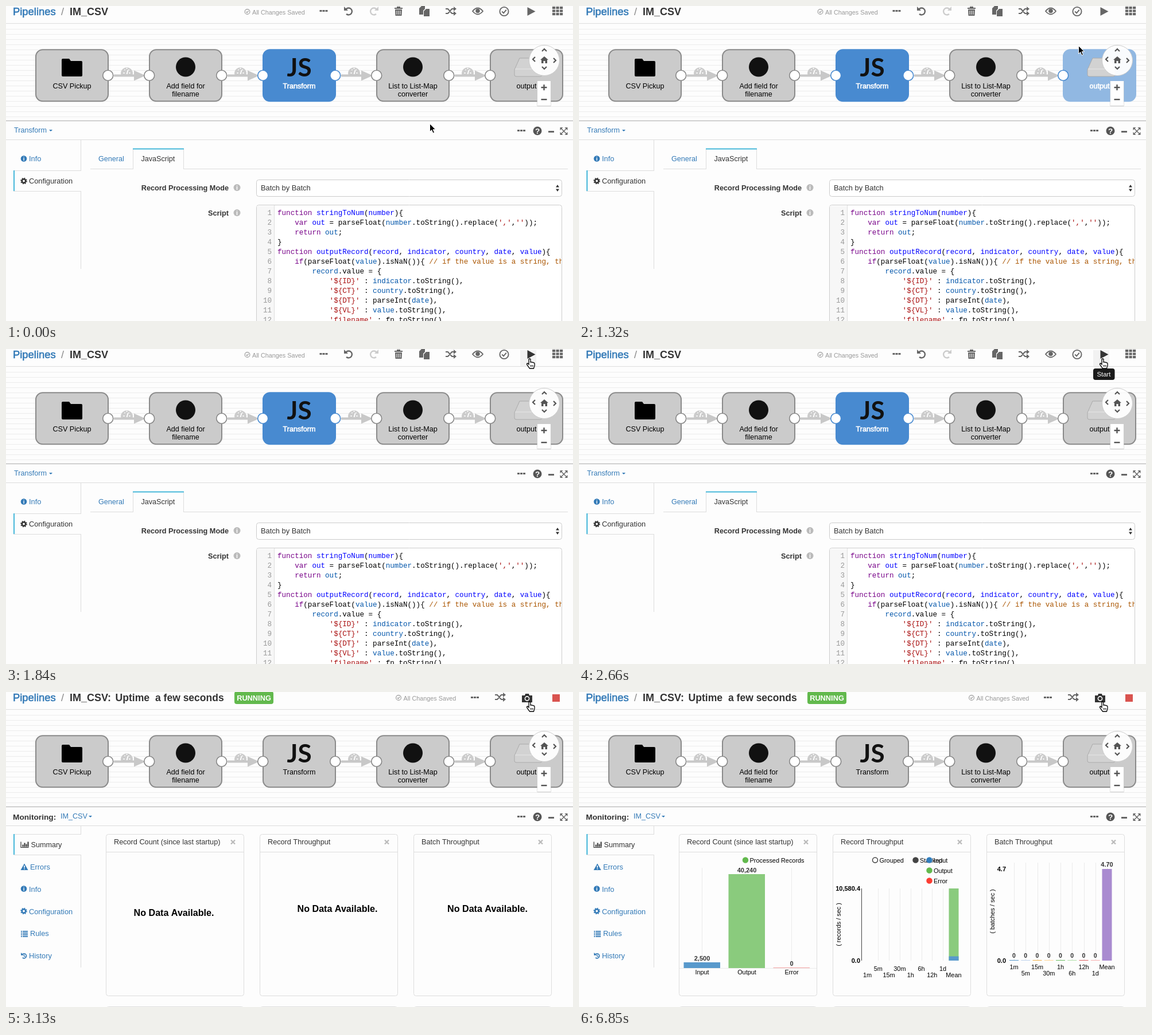
Recreate the animation shown at these times as an HTML page with a canvas. Size 988x550 px, loop 8000 ms.

```html
<!DOCTYPE html>
<html lang="en">
<head>
<meta charset="utf-8">
<title>Pipeline run</title>
<style>
  html, body { margin: 0; width: 100%; height: 100%; overflow: hidden; background: #fdfdfd; }
  canvas { display: block; }
</style>
</head>
<body>
<canvas id="stage" width="988" height="550"></canvas>
<script>
const ctx = document.getElementById('stage').getContext('2d');
const SANS = '"Liberation Sans", Arial, sans-serif';
const MONO = '"Liberation Mono", monospace';
const HEAVY = 'Lato, sans-serif';
const BLUE = '#337ab7', INK = '#333', ICON = '#666', RULE = '#ddd';
const LOOP = 8000;

// Drawing helpers
function text(s, x, y, { size = 12.8, color = INK, bold = false, medium = false, align = 'left', font = SANS } = {}) {
  ctx.font = `${bold ? 'bold ' : ''}${size}px ${font}`;
  ctx.fillStyle = ctx.strokeStyle = color;
  ctx.textAlign = align;
  ctx.fillText(s, x, y);
  if (medium) {
    ctx.lineWidth = .6;
    ctx.strokeText(s, x, y);
  }
}
function rect(x, y, w, h, color) {
  ctx.fillStyle = color;
  ctx.fillRect(x, y, w, h);
}
function paint(path, fill, stroke, width = 1) {
  if (fill) { ctx.fillStyle = fill; ctx.fill(path); }
  if (stroke) { ctx.strokeStyle = stroke; ctx.lineWidth = width; ctx.stroke(path); }
}
function box(x, y, w, h, r, fill, stroke, width) {
  const p = new Path2D();
  p.roundRect(x, y, w, h, r);
  paint(p, fill, stroke, width);
}
function disc(x, y, r, fill, stroke, width) {
  const p = new Path2D();
  p.arc(x, y, r, 0, 7);
  paint(p, fill, stroke, width);
}
function icon(d, x, y, fill, stroke, width, scale = 1, flip = 1) {
  ctx.save();
  ctx.translate(x, y);
  ctx.scale(scale * flip, scale);
  paint(new Path2D(d), fill, stroke, width);
  ctx.restore();
}

// Icons
const dots = (x, y) => [0, 5, 10].forEach(dx => rect(x + dx, y - 1.5, 4, 3, ICON));
function undo(x, y, color, flip = 1, scale = 1) {
  icon('M-5-3A6 6 0 1 1-4 5', x, y, null, color, 2.4, scale, flip);
  icon('M-8-8V-1H-1Z', x, y, color, null, 1, scale, flip);
}
function shuffle(x, y) {
  icon('M-9-4H-5L2 4H6M-9 4H-5L2-4H6', x, y, null, ICON, 2);
  icon('M5-8 10-4 5 0ZM5 0 10 4 5 8Z', x, y, ICON);
}
function checkRing(x, y, color, scale) {
  icon('M8 0A8 8 0 1 1-8 0A8 8 0 1 1 8 0M-4 0-1 3 4-3', x, y, null, color, 2, scale);
}
function badge(x, y, r, sign, color) {
  disc(x, y, r, color);
  text(sign, x, y + r * .65, { size: r * 1.8, color: '#fff', bold: true, align: 'center' });
}
function gear(x, y, color) {
  disc(x, y, 3.2, null, color, 2.6);
  ctx.setLineDash([2, 1.9]);
  disc(x, y, 5, null, color, 1.6);
  ctx.setLineDash([]);
}
const caret = (x, y) => icon('M-3-1H3L0 2Z', x, y, BLUE);

// Header
function savedNote(x) {
  checkRing(x, 10, '#999', .55);
  text('All Changes Saved', x + 8.5, 15, { size: 10.8, color: '#999' });
}
function header(running, hover) {
  rect(0, 30, 988, 1, RULE);
  text('Pipelines', 12, 16, { size: 18.4, color: BLUE, medium: true });
  text('/', 96, 16, { size: 18, color: '#888' });
  text(running ? 'IM_CSV:' : 'IM_CSV', 111, 16, { size: 18, bold: true });
  if (running) {
    text('Uptime', 190.5, 16, { size: 17.6, bold: true });
    text('a few seconds', 260, 16, { size: 17.5, bold: true });
    box(398, -1, 68, 22, 4, '#62b94d');
    text('RUNNING', 432, 15, { color: '#fff', bold: true, align: 'center' });
    savedNote(684);
    dots(810, 9.5);
    shuffle(861, 9);
    icon('M-9-5H-4L-3-8H3L4-5H9V7H-9Z', 908, 11, INK);
    disc(908, 11.5, 3.6, null, '#fff', 1.6);
    rect(952, 4, 13, 13, '#d9534f');
    return;
  }
  savedNote(420.5);
  dots(546.5, 8.5);
  undo(597, 9, ICON);
  undo(641, 9, '#ccc', -1);
  icon('M-7-6H-3V-8H3V-6H7V-4H-7ZM-6-3H6L5.5 8H-5.5Z', 684, 9, ICON);
  icon('M-3-1V6M0-1V6M3-1V6', 684, 9, null, '#fdfdfd', 1);
  icon('M-9-5-5-9H1V-4L-2-1V6H-9ZM-1 0 3-4H9V9H-1Z', 729, 9, ICON);
  shuffle(775, 9);
  icon('M-9 0Q0-11 9 0Q0 11-9 0Z', 822, 9, null, ICON, 1.8);
  disc(822, 8.5, 3.8, ICON);
  checkRing(868, 9.5, ICON, .95);
  if (hover) rect(896, 2, 28, 28, '#f2f2f2');
  icon('M0 0 14 7.5 0 15Z', 908.5, 2, hover ? INK : ICON);
  for (let i = 0; i < 9; i++) rect(952 + i % 3 * 6.5, 1 + (i / 3 | 0) * 5.5, 5.2, 4.2, ICON);
}

// Pipeline graph
const NODES = [['CSV Pickup'], ['Add field for', 'filename'], ['Transform'], ['List to List-Map', 'converter'], ['output']];
function nodeArt(i, x) {
  if (i === 0) icon('M0 2Q0 0 2 0H13L16 4H34Q36 4 36 6V29Q36 31 34 31H2Q0 31 0 29Z', x + 46, 92, '#000');
  if (i === 1 || i === 3) disc(x + 64, 106.5, 17, '#111');
  if (i === 2) text('JS', x + 64, 123, { size: 44, color: '#111', bold: true, align: 'center', font: HEAVY });
  if (i === 4) {
    const g = ctx.createLinearGradient(0, 91, 0, 123);
    g.addColorStop(0, '#d2d2d2');
    g.addColorStop(.55, '#c2c2c2');
    g.addColorStop(.65, '#a8a8a8');
    g.addColorStop(1, '#858585');
    icon('M9 0H39L48 20V29Q48 32 45 32H3Q0 32 0 29V20Z', x + 43, 91, g, '#aaa');
    icon('M1 19H47', x + 43, 91, null, '#e0e0e0', 1.5);
  }
}
function graph(selected, hovered) {
  for (let y = 40; y < 200; y += 9) rect(0, y, 988, 1, '#ececec');
  for (let i = 0; i < 4; i++) {
    const x = 178 + i * 198;
    icon('M-10 6A10.5 10.5 0 1 1 10 6Z', x + 32.5, 115, '#ccc');
    icon('M-6 2H-4M-4-4-3-3M0-7V-5M4-4 3-3M6 2H4M0 4 2-3', x + 32.5, 115, null, '#fff', 1.8);
    rect(x + 10, 119.5, 38, 4, '#c8c8c8');
    icon('M0-9 20 0 0 9Z', x + 45, 121.5, '#c8c8c8');
  }
  NODES.forEach((lines, i) => {
    const x = 51 + i * 198, on = selected && i === 2, lit = hovered && i === 4;
    const fill = on ? '#488ad0' : lit ? '#91b8e2' : '#cbcbcb';
    const edge = on || lit ? fill : '#8a8a8a';
    box(x + 1, 76.2, 126, 90, 12, fill, edge, 2);
    nodeArt(i, x);
    lines.forEach((s, k) => text(s, x + 64, 144 + k * 14,
      { size: 12.6, color: on || lit ? '#fff' : '#000', medium: on || lit, align: 'center' }));
    const ring = on || lit ? '#488ad0' : '#888';
    if (i > 0) disc(x + .7, 121.3, 9, '#fff', ring, 1.6);
    if (i < 4) disc(x + 126.7, 121.3, 9, '#fff', ring, 1.6);
  });
  // Pan and zoom controls
  disc(938, 95, 26.5, 'rgba(255,255,255,.95)', '#ccc');
  icon('M-4-16 0-20 4-16M-4 11 0 15 4 11M-16-6-20-2-16 2M16-4 20 0 16 4', 938, 95, null, '#555', 2.2);
  icon('M-7 0 0-6 7 0H5V6H1.5V2H-1.5V6H-5V0Z', 938, 94, '#555');
  rect(925.5, 131, 24, 44, '#ccc');
  rect(926, 131, 23, 43, '#fff');
  rect(932.5, 141, 10, 2.4, '#555');
  rect(936.3, 137.2, 2.4, 10, '#555');
  rect(932.5, 162, 10, 2.4, '#555');
}

// Lower pane
function paneFrame() {
  rect(0, 200, 988, 1, '#aaa');
  rect(0, 233, 988, 1, RULE);
  dots(891, 217.5);
  badge(926, 218, 7.5, '?', '#555');
  rect(945, 218, 10, 3, ICON);
  icon('M-4-4 4 4M4-4-4 4', 972, 218.5, null, ICON, 1.4);
  icon('M-6.5-6.5H-1.5L-6.5-1.5ZM6.5-6.5V-1.5L1.5-6.5ZM6.5 6.5H1.5L6.5 1.5ZM-6.5 6.5V1.5L-1.5 6.5Z', 972, 218.5, ICON);
}
function sideNav(activeTop, bottom) {
  rect(130, 234, 1, activeTop - 234, RULE);
  rect(130, activeTop + 36, 1, bottom - activeTop - 36, RULE);
  rect(13, activeTop, 118, 1, RULE);
  rect(13, activeTop + 36, 118, 1, RULE);
  rect(13, activeTop, 2, 36, '#46b8da');
}

const CODE = [
  'function stringToNum(number){',
  "    var out = parseFloat(number.toString().replace(',',''));",
  '    return out;',
  '}',
  'function outputRecord(record, indicator, country, date, value){',
  '    if(parseFloat(value).isNaN()){ // if the value is a string, then',
  '        record.value = {',
  "            '${ID}' : indicator.toString(),",
  "            '${CT}' : country.toString(),",
  "            '${DT}' : parseInt(date),",
  "            '${VL}' : value.toString(),",
  "            'filename' : fn.toString(),"
];
function tokenColor(token, line, at) {
  if (token.startsWith('//')) return '#a50';
  if (token[0] === "'") return '#a11';
  if (/^(function|var|return|if)$/.test(token)) return '#708';
  if (!/^\w/.test(token) || line[at - 1] === '.') return '#000';
  if (line.startsWith('function') || line.slice(0, at).endsWith('var ')) return '#00f';
  return /^(number|out|record|indicator|country|date|value)$/.test(token) ? '#05a' : '#000';
}
function editor() {
  box(436.5, 347.5, 532, 220, 4, '#fff', '#ccc');
  rect(437, 349, 30, 201, '#f7f7f7');
  rect(467, 348, 1, 202, RULE);
  ctx.save();
  ctx.beginPath();
  ctx.rect(437, 348, 531, 202);
  ctx.clip();
  CODE.forEach((line, i) => {
    const y = 364.6 + i * 17, style = { size: 12.58, font: MONO };
    text(i + 1, 463, y, { ...style, color: '#999', align: 'right' });
    for (const m of line.matchAll(/\/\/.*|'[^']*'|\w+|[^\w'\/]+/g))
      text(m[0], 473 + m.index * 7.55, y, { ...style, color: tokenColor(m[0], line, m.index) });
  });
  ctx.restore();
}
function configPane() {
  text('Transform', 14, 221, { size: 12.6, color: BLUE });
  caret(78, 217);
  sideNav(287, 459);
  badge(31, 266.5, 5.3, 'i', BLUE);
  text('Info', 40, 271, { color: BLUE });
  gear(31, 305.5, INK);
  text('Configuration', 40, 310);

  rect(147, 284, 75, 1, RULE);
  rect(309, 284, 670, 1, RULE);
  rect(221, 249, 1, 36, RULE);
  rect(309, 249, 1, 36, RULE);
  rect(221, 248.5, 89, 2, '#46b8da');
  text('General', 161, 271, { size: 12.6, color: BLUE });
  text('JavaScript', 235.5, 271, { size: 12.6 });

  text('Record Processing Mode', 388, 322, { size: 12.7, bold: true, align: 'right' });
  text('Script', 388, 366, { size: 12.7, bold: true, align: 'right' });
  badge(402.5, 317, 6, 'i', '#bbb');
  badge(402.5, 361, 6, 'i', '#bbb');
  box(436.5, 303.5, 532, 29, 4, '#fff', '#ccc');
  text('Batch by Batch', 444, 322, { size: 12.9 });
  icon('M-3-1.5 0-6 3-1.5ZM-3 1.5 0 6 3 1.5Z', 961, 318, INK);
  editor();
}

function monitorNav() {
  text('Monitoring:', 12, 223, { size: 13.7, bold: true });
  text('IM_CSV', 95, 221, { size: 12.6, color: BLUE });
  caret(147, 217);
  sideNav(248, 481);
  icon('M-6.5-5V5H7', 32.5, 266.5, null, INK, 1.2);
  icon('M-4 0H-2V4H-4ZM-1-3H1V4H-1ZM2-1H4V4H2ZM5-5H7V4H5Z', 32.5, 266.5, INK);
  text('Summary', 43.5, 271, { size: 12.6 });
  icon('M0-6 6.5 5.5H-6.5Z', 32, 305.5, BLUE);
  rect(31.2, 303, 1.6, 4, '#fff');
  rect(31.2, 308, 1.6, 1.5, '#fff');
  badge(31, 343.5, 5.3, 'i', BLUE);
  gear(31, 382.5, BLUE);
  for (let y = 417; y < 427; y += 3) {
    rect(26, y, 2, 1.8, BLUE);
    rect(29, y, 9, 1.8, BLUE);
  }
  undo(31.5, 460.5, BLUE, 1, .68);
  icon('M0-2.5V1H2.5', 31.5, 460.5, null, BLUE, 1.2);
  [['Errors', 42], ['Info', 40], ['Configuration', 40], ['Rules', 42], ['History', 40]].forEach(
    ([s, x], i) => text(s, x, 310 + i * 38.8, { color: BLUE }));
}

// Charts
const SMALL = { size: 10.9, color: '#000' };
const MID = { ...SMALL, align: 'center' };
const VALUE = { ...MID, size: 11, color: INK, bold: true };
const AXIS = { ...SMALL, size: 11, bold: true, align: 'right' };
const SPANS = ['1m', '5m', '15m', '30m', '1h', '6h', '12h', '1d', 'Mean'];
const SPAN_COLORS = ['#5899cc', '#bed2ec', '#f2b044', '#ffd596', '#6abf61', '#b0e0a8', '#e06060', '#f7b0b0'];

function axisTitle(s, x, y) {
  ctx.save();
  ctx.translate(x, y);
  ctx.rotate(-Math.PI / 2);
  text(s, 0, 0, MID);
  ctx.restore();
}
function legend(s, x, y, fill, stroke = fill) {
  disc(x, y, 4.5, fill, stroke, 1.5);
  text(s, x + 7.5, y + 4, SMALL);
}
function countChart({ shift, counts, inputHeight }) {
  const base = 473 + shift;
  legend('Processed Records', 290, 284.5 + shift, '#62b94d');
  const bars = [['Input', inputHeight, '#5899cc'], ['Output', 164, '#8acb7d'], ['Error', 1, '#f5a3a3']];
  bars.forEach(([name, h, color], i) => {
    const x = 214.5 + i * 78;
    rect(x - .5, base - 175, 1, 175, '#ebebeb');
    rect(x - 32, base - h, 63.5, h, color);
    text(counts[i], x, base - h - 3.5, VALUE);
    text(name, x, base + 11, MID);
  });
  rect(175, base, 239, 1, '#ebebeb');
}
function recordChart({ rate, inputShare }) {
  legend('Grouped', 516, 293.5, '#fff', '#444');
  legend('Stacked', 586.5, 293.5, '#444');
  legend('Input', 610.5, 293.5, '#337fbe');
  legend('Output', 610.5, 311.5, '#62b94d');
  legend('Error', 610.5, 329.5, '#fc3d32');
  SPANS.forEach((s, i) => {
    const x = 502.5 + i * 18.8;
    if (i) rect(Math.round(x), 343, 1, 126, '#ebebeb');
    text(s, x, i % 2 ? 487 : 498, MID);
  });
  rect(492, 343, 1, 126, '#444');
  rect(644.5, 343, 17, 126, '#8acb7d');
  rect(644.5, 469 - inputShare, 17, inputShare, '#5899cc');
  text(rate, 490, 347, AXIS);
  text('0.0', 490, 473, AXIS);
  axisTitle('( records / sec )', 456, 406);
}
function batchChart({ top, mean }) {
  SPANS.forEach((s, i) => {
    const x = 758 + i * 20.25;
    rect(Math.round(x), 298, 1, 171, '#ebebeb');
    text(s, x, i % 2 ? 495 : 484, MID);
    if (i === 8) return;
    rect(x - 8, 468, 16, 1, SPAN_COLORS[i]);
    text('0', x, 464, { ...VALUE, size: 10.5 });
  });
  rect(911.5, 309, 17, 160, '#a98bd0');
  text(mean, 920, 305, VALUE);
  text(top, 744, 313, AXIS);
  text('0.0', 744, 473, AXIS);
  axisTitle('( batches / sec )', 724, 383);
}
const SAMPLES = [
  { from: 6850, shift: 9, counts: ['2,500', '40,240', '0'], inputHeight: 10, rate: '10,580.4', inputShare: 7.5, top: '4.7', mean: '4.70' },
  { from: 4990, shift: 0, counts: ['932', '18,848', '0'], inputHeight: 8, rate: '9,684.8', inputShare: 6, top: '2.0', mean: '1.96' }
];
function cards(t) {
  ['Record Count (since last startup)', 'Record Throughput', 'Batch Throughput'].forEach((title, i) => {
    const x = 174.5 + i * 268;
    box(x, 248.5, 240, 282, 4, '#fdfdfd', RULE);
    box(x, 549.5, 240, 40, 4, null, RULE);
    rect(x, 279, 240, 1, RULE);
    text(title, x + 13.5, 266, { size: 12.7 });
    icon('M-3.5-3.5 3.5 3.5M3.5-3.5-3.5 3.5', x + 221, 262, null, '#bbb', 2.4);
  });
  const sample = SAMPLES.find(s => t >= s.from);
  if (sample) {
    countChart(sample);
    recordChart(sample);
    batchChart(sample);
  } else {
    [[292.5, 391], [577.5, 384], [839, 384]].forEach(([x, y]) =>
      text('No Data Available.', x, y, { size: 16.1, color: '#000', bold: true, align: 'center' }));
  }
}

// Pointer: two moves in even ticks
const MOVES = [
  { start: 530, end: 1320, steps: 14, from: [738.5, 205.5], to: [870.5, 69.5] },
  { start: 1380, end: 1840, steps: 9, from: [870.5, 69.5], to: [911.5, 17] }
];
function pointerAt(t) {
  const m = t < MOVES[1].start ? MOVES[0] : MOVES[1];
  const tick = (m.end - m.start) / (m.steps - 1);
  const k = Math.min(1, Math.max(0, Math.floor((t - m.start) / tick + 1.001) / m.steps));
  const ease = k * k * (3 - 2 * k);
  return m.from.map((a, i) => a + (m.to[i] - a) * ease);
}
function pointer(x, y, hand) {
  if (hand) {
    icon('M4 2Q5.5 0 7 2V7Q8.5 6 9.5 7.5Q11 6.5 12 8Q14 7.5 14 10V13L12.5 18H5.5L.8 11.5Q0 9 2 9L4 11Z', x - 4.5, y - 1, '#fff', '#000', 1.3);
    icon('M7 12V15M9 12V15M11 12V15', x - 4.5, y - 1, null, '#000', .9);
  } else {
    icon('M0 0V14L3.2 11 5.6 16.5 8 15.5 5.7 10.2H10Z', x, y, '#000', '#fff', 1);
  }
}
function tooltip(t) {
  if (t < 2200 || t >= 2890) return;
  ctx.globalAlpha = Math.min(1, (t - 2145) / 165);
  box(896, 34, 37.5, 20, 4, '#1a1a1a');
  text('Start', 914.5, 48, { size: 11.4, color: '#fff', align: 'center' });
  ctx.globalAlpha = 1;
}

function draw(t) {
  const [x, y] = pointerAt(t);
  const hand = y < 30, launched = t >= 2890, running = t >= 3130;
  rect(0, 0, 988, 550, '#fdfdfd');
  header(running, hand);
  graph(!launched, x > 843 && y > 68 && t < 1380);
  paneFrame();
  if (launched) monitorNav(); else configPane();
  if (running) cards(t);
  tooltip(t);
  pointer(x, y, hand);
}
function frame() {
  draw(performance.now() % LOOP);
  requestAnimationFrame(frame);
}
frame();
</script>
</body>
</html>
```
